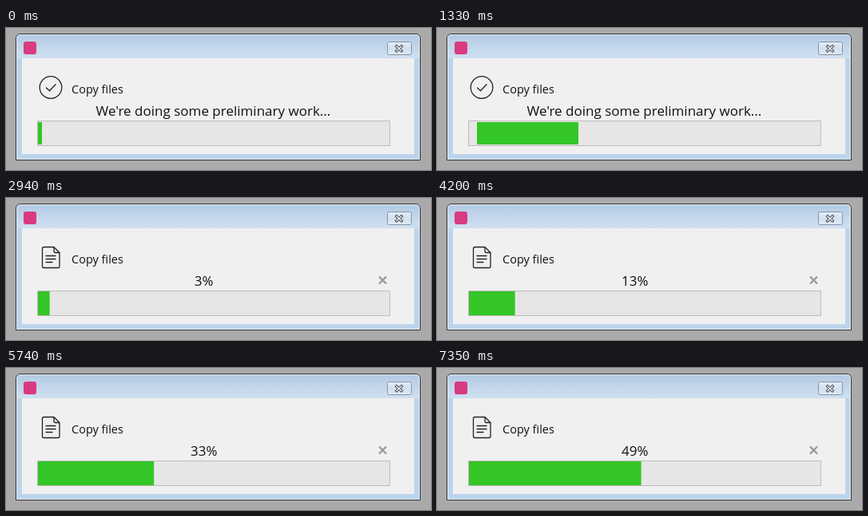
Write an HTML page that moves like this. It is 532 px wide and 178 px high and loops after 8 s.

```html
<!DOCTYPE html>
<html lang="en">
<head>
<meta charset="utf-8">
<title>Copy files</title>
<style>
  html, body { margin: 0; width: 100%; height: 100%; overflow: hidden; background: #aaa; }
  svg { display: block; width: 532px; height: 178px; }
  text { font-family: "Open Sans", "Noto Sans", sans-serif; fill: #111; }
  .line { fill: none; stroke: #222; stroke-width: 1.3; stroke-linecap: round; stroke-linejoin: round; }
</style>
</head>
<body>
<svg viewBox="0 0 532 178">
  <defs>
    <linearGradient id="caption" x2="0" y2="1">
      <stop offset="0" stop-color="#b4cbe4"/>
      <stop offset="1" stop-color="#d0e0f1"/>
    </linearGradient>
    <linearGradient id="button" x2="0" y2="1">
      <stop offset="0" stop-color="#e6eef7"/>
      <stop offset=".5" stop-color="#d3e0ee"/>
      <stop offset="1" stop-color="#dfe9f4"/>
    </linearGradient>
    <clipPath id="track"><rect x="40" y="117" width="440" height="30"/></clipPath>
  </defs>

  <!-- window -->
  <path d="M12.5 165.5V13a5.5 5.5 0 0 1 5.5-5.500H513a5.500 5.500 0 0 1 5.500 5.500V165.500Z" fill="#bcd4ec" stroke="#333"/>
  <path d="M14 38V13.500a4.500 4.500 0 0 1 4.500-4.500H512.500a4.500 4.500 0 0 1 4.500 4.500V38Z" fill="url(#caption)"/>
  <path d="M13.500 164.500V13a4.500 4.500 0 0 1 4.500-4.500H513a4.500 4.500 0 0 1 4.500 4.500V164.500Z" fill="none" stroke="#e4f0fa"/>
  <rect x="20" y="38" width="491" height="120" fill="#f0f0f0"/>
  <rect x="22" y="17" width="16" height="16" rx="3" fill="#d93a80"/>
  <rect x="477.500" y="17.500" width="30" height="16" rx="2" fill="url(#button)" stroke="#8795a8"/>
  <g fill="none" stroke-linecap="square">
    <path d="M489 23l6 5.500M495 23l-6 5.500" stroke="#4a5361" stroke-width="3.600"/>
    <path d="M489 23l6 5.500M495 23l-6 5.500" stroke="#f4f6f9" stroke-width="1.400"/>
  </g>

  <!-- icons -->
  <g id="check" class="line">
    <circle cx="56" cy="74.500" r="13.800"/>
    <path d="M50.500 75l4 3.800 7.500-8"/>
  </g>
  <g id="page" class="line">
    <path d="M60 61.500H47.500a2 2 0 0 0-2 2V85.500a2 2 0 0 0 2 2H65a2 2 0 0 0 2-2V68.500ZV66.500a2 2 0 0 0 2 2H67"/>
    <path d="M50 72.500H62M50 76.500H62M50 80.500H58"/>
  </g>
  <path id="stop" d="M467 98.500l9 9M476 98.500l-9 9" fill="none" stroke="#989898" stroke-width="2.300"/>

  <!-- labels -->
  <text x="82" y="82" font-size="14.500">Copy files</text>
  <text id="message" x="112.500" y="110" font-size="17">We're doing some preliminary work...</text>
  <text id="percent" x="247.700" y="110" font-size="17" text-anchor="middle"></text>

  <!-- progress bar -->
  <rect x="39.500" y="116.500" width="441" height="31" fill="#e6e6e6" stroke="#bcbcbc"/>
  <g clip-path="url(#track)"><rect id="fill" fill="#34c626"/></g>
</svg>
<script>
  const LOOP = 8000, STEP = 70, LEFT = 40, WIDTH = 440, CHUNK = 127;
  const SWITCH = 2240, COUNT = 2870;

  // runs of even steps: [start ms, steps, value reached]
  const sweep = [[140, 4, 80], [490, 4, 118], [840, 8, 177], [1400, 12, 273],
                 [2240, 1, 281], [2730, 2, 344]];
  const progress = [[2870, 3, 5], [3570, 3, 13], [4200, 1, 13.1], [4270, 8, 24],
                    [4900, 2, 25], [5530, 5, 35], [6090, 3, 38.5], [6720, 1, 39],
                    [6790, 1, 43], [7140, 4, 49]];

  const el = id => document.getElementById(id);
  const show = (id, on) => el(id).setAttribute("visibility", on ? "visible" : "hidden");

  function valueAt(runs, from, t) {
    for (const [start, steps, to] of runs) {
      if (t < start) break;
      const k = Math.min(steps, Math.floor((t - start) / STEP) + 1);
      from += (to - from) * k / steps;
    }
    return from;
  }

  function setFill(x, y, width, height) {
    const box = { x, y, width, height };
    for (const key in box) el("fill").setAttribute(key, box[key]);
  }

  function draw(t) {
    const copying = t >= SWITCH, counting = t >= COUNT;
    show("check", !copying);
    show("message", !copying);
    show("page", copying);
    show("stop", copying);
    show("percent", counting);
    if (counting) {
      const p = valueAt(progress, 0, t);
      el("percent").textContent = Math.floor(p + 1e-6) + "%";
      setFill(LEFT, 117, WIDTH * p / 100, 30);
    } else {
      setFill(valueAt(sweep, 45, t) - CHUNK, 118, CHUNK, 28);
    }
  }

  const begin = performance.now();
  function tick() {
    draw((performance.now() - begin) % LOOP);
    requestAnimationFrame(tick);
  }
  tick();
</script>
</body>
</html>
```
